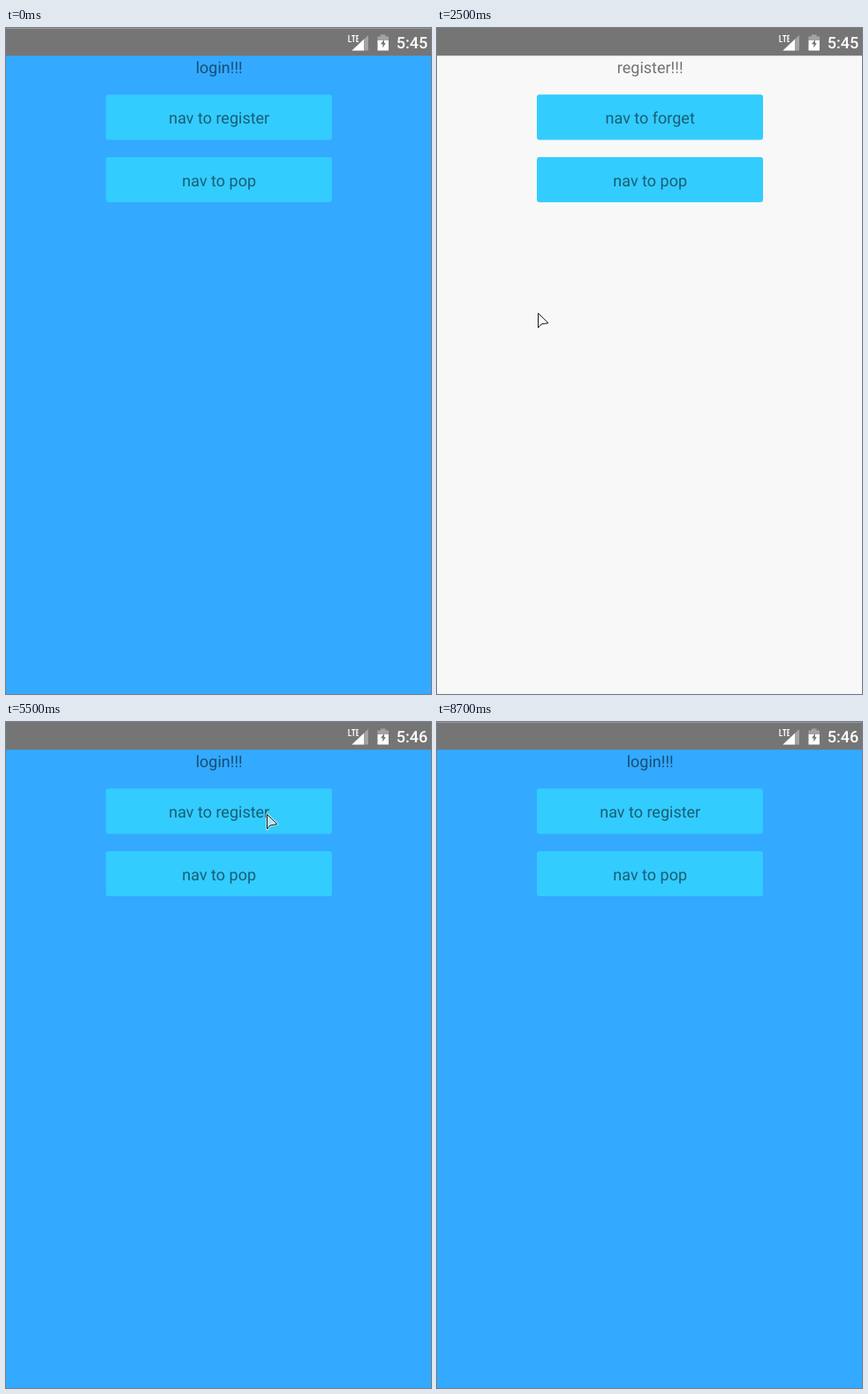
Write an HTML page that moves like this. It is 481x753 px and loops after 8800 ms.

```html
<!DOCTYPE html>
<html lang="en">
<head>
<meta charset="utf-8">
<title>Page navigation</title>
<style>
html, body { margin: 0; width: 100%; height: 100%; overflow: hidden; background: #33a9ff; }
svg { display: block; width: 100%; height: 100%; }
text { font: 18px Roboto, sans-serif; text-anchor: middle; text-rendering: geometricPrecision; fill: #000; fill-opacity: .54; }
#clock { font-weight: 500; text-anchor: start; fill: #fff; fill-opacity: 1; }
.btn { fill: #33ccff; }
</style>
</head>
<body>
<svg viewBox="0 0 481 753">
  <rect width="481" height="753" fill="#33a9ff"/>
  <g id="login"></g>
  <g id="register"><rect x="-5" y="30" width="491" height="723" fill="#f8f8f8"/></g>

  <rect width="481" height="31.3" fill="#757575"/>
  <rect id="topLine" width="481" height="1" fill="#979797"/>
  <path d="M388 8V15.5H391M391.2 8.6H395.4M393.3 8.6V16M399 8.6H396.9V15.4H399M396.9 12H398.8" fill="none" stroke="#fff" stroke-width="1.2"/>
  <path d="M391.5 25.5L410 8V25.5Z" fill="#a3a3a3"/>
  <path d="M391.5 25.5L405 12.7V25.5Z" fill="#fff"/>
  <path d="M420.5 9.5H424V7.5H429.5V9.5H433V14H420.5Z" fill="#a3a3a3"/>
  <path d="M420.5 14H433V25.5H420.5Z" fill="#fff"/>
  <path d="M428 13L424 18.3H426.4V22.5L429.8 17H428Z" fill="#757575"/>
  <text id="clock" x="441.7" y="23.4">5:45</text>

  <g id="cursor" stroke-linejoin="round">
    <path d="M.5 .5V17L4.2 12.8L12 11.6Z" fill="#fff" fill-opacity=".55" stroke="#fff" stroke-opacity=".6" stroke-width="3"/>
    <path d="M.5 .5V17L4.2 12.8L12 11.6Z" fill="none" stroke="#111"/>
  </g>
</svg>
<script>
const LOOP = 8800, STEP = 100, OUT = 486;
const el = id => document.getElementById(id);

function addPage(id, title, first) {
  const label = (y, s) => `<text x="241.2" y="${y}">${s}</text>`;
  const button = (y, s) => `<rect class="btn" x="113" y="${y}" width="256" height="51.2" rx="3"/>` + label(y + 32.8, s);
  el(id).insertAdjacentHTML('beforeend',
    label(51, title) + button(75.2, first) + button(145.9, 'nav to pop'));
}
addPage('login', 'login!!!', 'nav to register');
addPage('register', 'register!!!', 'nav to forget');

const easeIn = n => p => p ** n;
const easeOut = n => p => 1 - (1 - p) ** n;
const smooth = p => p * p * (3 - 2 * p);
const ramp = (t, start, length, ease) => ease(Math.min(1, Math.max(0, (t - start) / length)));

// Pointer glides along a curve bent towards via
const onButton = [291, 99], atEdge = [11, 374], onRegister = [295, 104], onPop = [276, 160];
const glides = [
  { start: 100, length: 400, from: [399, 162], to: onButton, ease: easeOut(1.5) },
  { start: 1900, length: 1000, from: onButton, via: [160, 335], to: atEdge, ease: smooth },
  { start: 3000, length: 1100, from: atEdge, to: [OUT, 391], ease: easeIn(1.55) },
  { start: 4300, length: 500, from: [469, 389], to: onRegister, ease: easeOut(1.5) },
  { start: 5600, length: 300, from: onRegister, to: onPop, ease: smooth },
  { start: 6400, length: 400, from: onPop, to: [OUT, 176], ease: easeIn(1.5) }
];

function pointer(t) {
  const g = glides.filter(g => t >= g.start).pop();
  if (!g) return [OUT, 0];
  const p = ramp(t, g.start, g.length, g.ease);
  return g.from.map((a, i) => {
    const b = g.to[i], c = g.via ? g.via[i] : (a + b) / 2;
    return Math.round(a * (1 - p) ** 2 + 2 * c * p * (1 - p) + b * p * p);
  });
}

function pageOffset(t) {
  const push = start => 1 - ramp(t, start, 305, easeOut(2));
  const drag = ramp(t, 3000, 1100, easeIn(2.39));
  const pop = ramp(t, 6100, 410, easeIn(2));
  const part = t < 3000 ? push(863) : t < 5000 ? drag : t < 6100 ? push(5539) : pop;
  return Math.round(OUT * part);
}

const move = (id, x, y) => el(id).setAttribute('transform', `translate(${x} ${y})`);

function draw(time) {
  const t = Math.floor(time % LOOP / STEP) * STEP;
  move('register', pageOffset(t), 0);
  move('cursor', ...pointer(t));
  el('clock').textContent = t < 5500 ? '5:45' : '5:46';
  el('topLine').style.display = t < 800 || t >= 8700 ? '' : 'none';
}

const begin = performance.now();
function tick() {
  draw(performance.now() - begin);
  requestAnimationFrame(tick);
}
tick();
</script>
</body>
</html>
```
